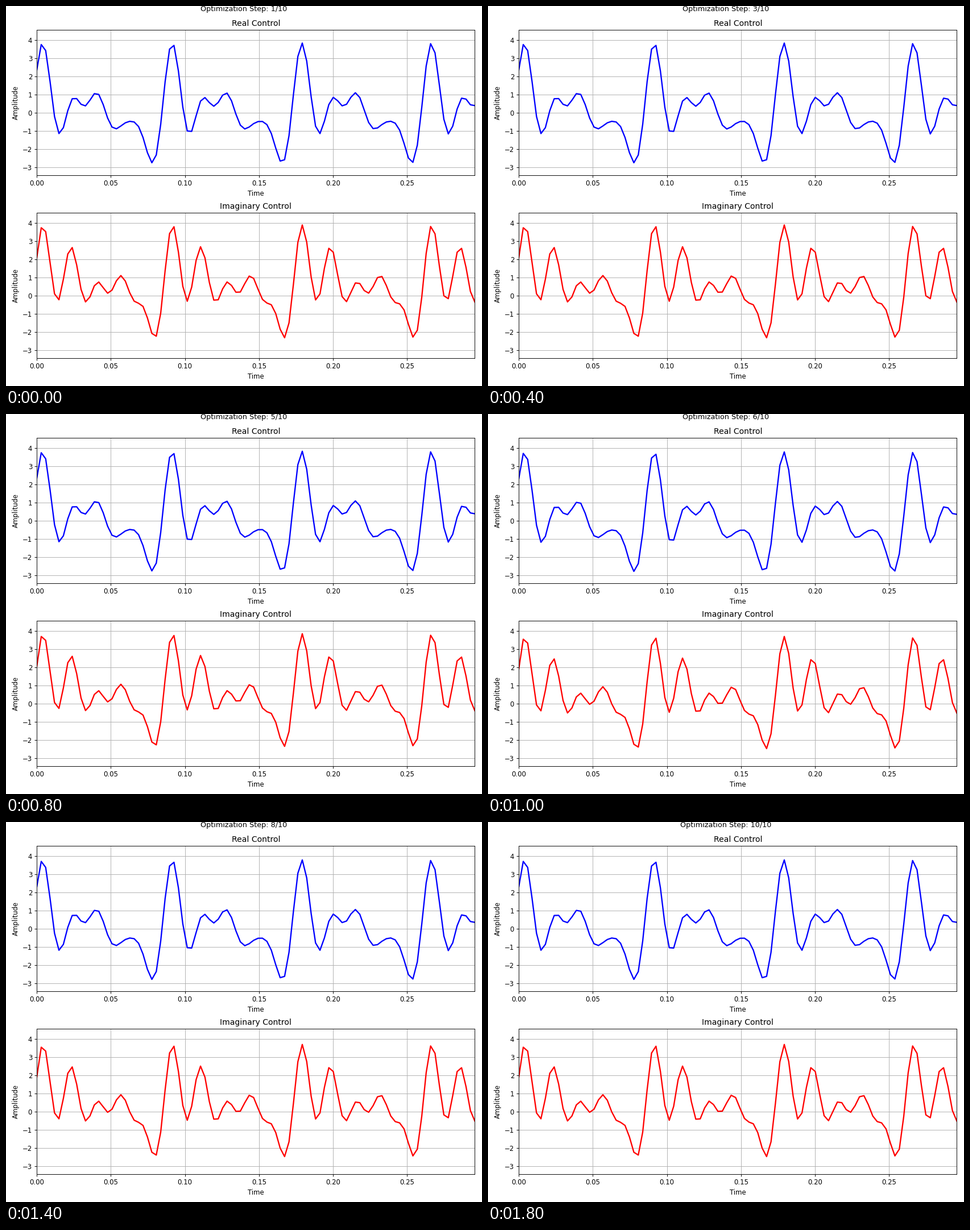
A matplotlib script that plays this animation: 837x669 px, repeating every 2000 ms.

```python
import numpy as np
import matplotlib.pyplot as plt
from matplotlib.animation import FuncAnimation

W, H, DPI = 837, 669, 83.7
STEPS, INTERVAL = 10, 200
SAMPLES, T_END = 100, 0.29578
OMEGA = 2 * np.pi * (SAMPLES - 1) / (29.3 * T_END)
LEFT, WIDTH, HEIGHT = 54.2, 770.2, 256

plt.rcParams["font.family"] = "DejaVu Sans"


def pulse(t, mean, cosines, sines):
    """Fourier sum; the k-th pair of weights belongs to harmonic k."""
    total = np.full_like(t, mean)
    for k, (a, b) in enumerate(zip(cosines, sines), start=1):
        total += a * np.cos(k * OMEGA * t) + b * np.sin(k * OMEGA * t)
    return total


def add_panel(top, title, color):
    ax = fig.add_axes([LEFT / W, 1 - (top + HEIGHT) / H, WIDTH / W, HEIGHT / H])
    ax.set(title=title, xlabel="Time", ylabel="Amplitude",
           xlim=(0, T_END), ylim=(-3.44, 4.577),
           xticks=np.arange(6) * 0.05, yticks=np.arange(-3, 5))
    ax.grid(True)
    return ax.plot([], [], color=color, lw=2)[0]


def converged(step):
    """Share of the total correction applied at a step."""
    if step < 4:
        return 0.0
    return 0.22 if step == 4 else 1.0


# The small margin keeps the pixel size from rounding down.
fig = plt.figure(figsize=((W + 0.01) / DPI, (H + 0.01) / DPI), dpi=DPI,
                 facecolor="white")
heading = fig.text(0.5, 1 - 9.4 / H, "", ha="center", va="baseline",
                   fontsize=11)

time = np.linspace(0, T_END, SAMPLES)
real = pulse(time, 0.034, [0.104, 0.794, 0.733, 0.711, 0.003],
             [0.974, 0.445, 0.990, 0.609, 0.466])
imag = pulse(time, 0.551, [0.053, 0.104, 0.707, 0.695, 0.0],
             [0.904, 0.919, 0.337, 0.658, 0.865])

# line, start pulse, total gain loss, total offset
curves = [
    (add_panel(42, "Real Control", "blue"), real, 0.002, -0.04),
    (add_panel(364, "Imaginary Control", "red"), imag, 0.006, -0.17),
]


def update(step):
    share = converged(step)
    heading.set_text(f"Optimization Step: {step + 1}/{STEPS}")
    for line, start, loss, offset in curves:
        line.set_data(time, start * (1 - loss * share) + offset * share)
    return [heading] + [curve[0] for curve in curves]


anim = FuncAnimation(fig, update, frames=STEPS, interval=INTERVAL,
                     init_func=lambda: update(0), repeat=True, repeat_delay=0)
plt.show()
```
